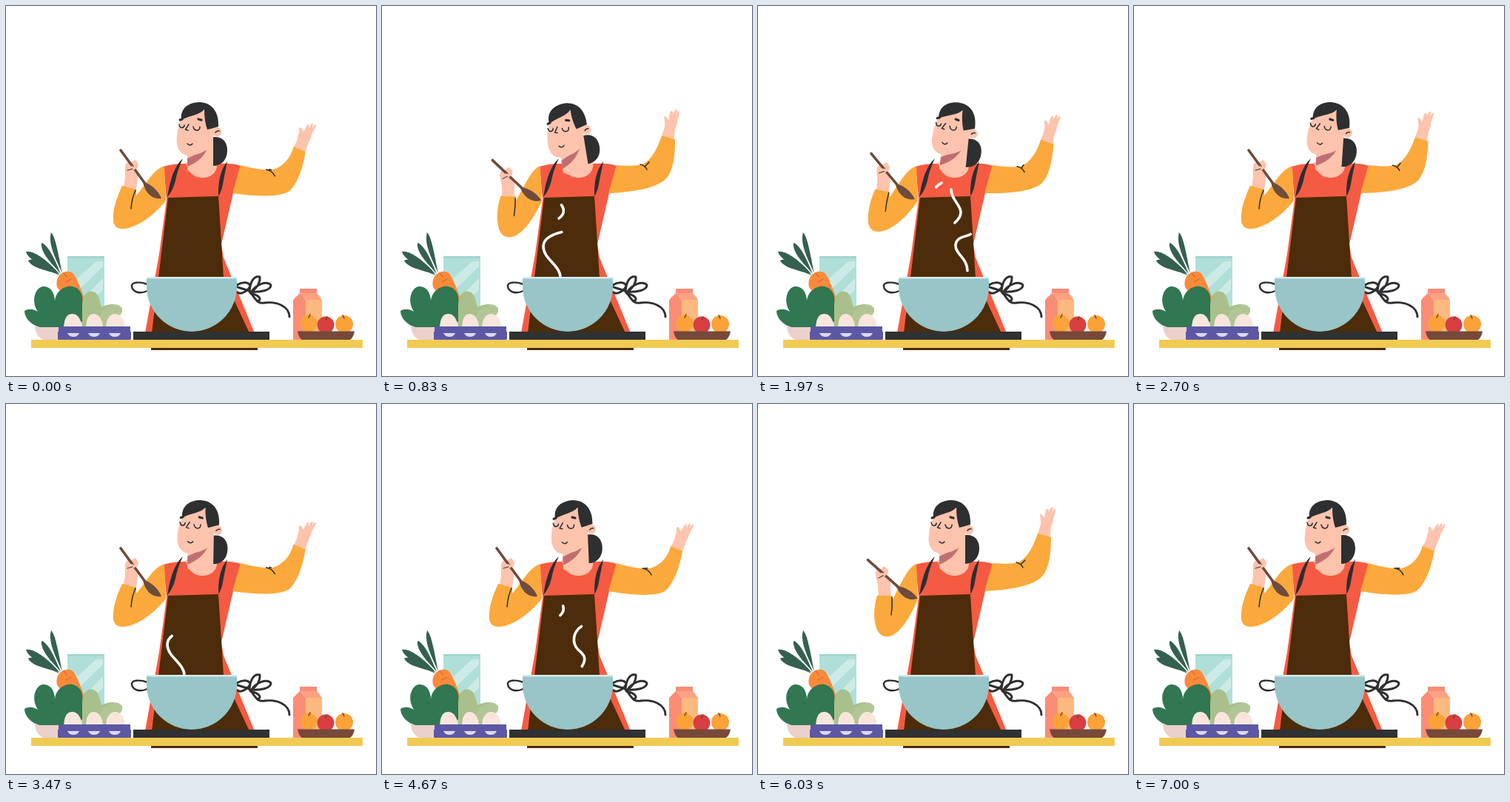
Animation of 500 by 500 pixels, one loop 7.03 s. Source, as an HTML page:

```html
<!DOCTYPE html>
<html lang="en">
<head>
<meta charset="utf-8">
<title>Cooking</title>
<style>
  html, body { margin: 0; width: 100%; height: 100%; overflow: hidden; background: #fff; }
  svg { display: block; width: 100%; height: 100%; }
  .line { fill: none; stroke: #2e2f31; stroke-linecap: round; stroke-linejoin: round; }
  .ink { fill: #2e2f31; }
  .skin { fill: #fdc3ad; }
  .sleeve { fill: #fba93c; }
  .steam path { fill: none; stroke: #fff; stroke-width: 3.6; stroke-linecap: round; }
</style>
</head>
<body>
<svg viewBox="0 0 500 500">
  <!-- glass and vegetables -->
  <rect x="83" y="338" width="50" height="95" fill="#b0dfd9"/>
  <path d="M83 338H133V341H83Z" fill="#a3d5cf"/>
  <path d="M92 372L122 345H131V352L100 382ZM104 396L131 368V384L112 402Z" fill="#cdebe6"/>
  <g fill="#33604f">
    <path d="M76 361C69 345 56 322 61 306C67 312 70 332 76 361Z"/>
    <path d="M74 362C64 350 46 334 48 320C57 323 66 342 74 362Z"/>
    <path d="M73 363C58 353 31 346 27 332C37 330 56 343 73 363Z"/>
    <path d="M72 364C60 357 36 356 30 344C40 339 58 348 72 364Z"/>
  </g>
  <path d="M69 379C66 365 78 355 89 360C94 363 102 383 108 401C96 397 74 391 69 379Z" fill="#f98a3c"/>
  <path class="line" d="M81 373L88 369M90 386L97 381M78 361L82 366" style="stroke:#d96a2b;stroke-width:1.3"/>
  <path d="M103 435V401C104 383 122 380 126 396L129 407C142 400 156 403 157 410C153 413 156 418 150 423L140 436Z" fill="#a9bf8c"/>
  <path d="M122 434C124 416 135 403 150 404C160 407 158 414 154 418L146 435Z" fill="#b2c596"/>
  <path d="M39 433H78V452H53Q40 448 39 433Z" fill="#ecd0cb"/>
  <path d="M48 434C39 434 25 424 25 412C31 408 38 410 43 413C33 398 40 380 50 379C60 378 66 388 66 399C67 385 80 377 90 379C101 382 105 391 103 403L103 426L95 434Z" fill="#317752"/>
  <path d="M78 434C79 420 83 416 90 416C98 416 102 426 103 434ZM108 434C109 421 112 416 119 416C126 416 131 426 131 434ZM135 434C136 421 141 416 148 416C156 416 161 426 161 434Z" fill="#f8e6dc"/>
  <path d="M71 433H168V440H169V449Q169 452 166 452H73Q70 452 70 449V440H71Z" fill="#5c58a5"/>
  <path d="M83 442H99Q97 447 91 447T83 442ZM111 442H127Q125 447 119 447T111 442ZM139 442H155Q153 447 147 447T139 442Z" fill="#dcd9ee"/>

  <!-- milk and fruit -->
  <path d="M397 388L388 397V453H405V397Z" fill="#f98d75"/>
  <path d="M397 388H420L427 397V453H405V397Z" fill="#fbb97f"/>
  <path d="M397 388H420L427 397H405Z" fill="#fba184"/>
  <path d="M397 382H420V388H397Z" fill="#f98d75"/>
  <circle cx="409" cy="429" r="11.5" fill="#fba338"/>
  <circle cx="432" cy="431" r="11.5" fill="#d83f40"/>
  <circle cx="457" cy="430" r="12" fill="#fba338"/>
  <path class="line" d="M409 421L411 417M432 424L434 420M457 422L455 418" style="stroke:#6b4a2a;stroke-width:1.6"/>
  <path d="M394 439.500H471Q469 453 457 453H407Q396 453 394 439.500Z" fill="#76493a"/>

  <!-- dress, apron, ties -->
  <path d="M213 217Q225 213 242 213H288Q306 212 317 216L307 253L291 322L294 340L336 442H188L207 335L217 262Z" fill="#f55b42"/>
  <path d="M219 259L287 257L294 367L329 442H197L206 367Z" fill="#4c2c0a"/>
  <path d="M196 461H340V465H196Z" fill="#4c2c0a"/>
  <path class="line" d="M191 376C180 372 169 373 170 379C171 386 180 390 191 385" stroke-width="2.400"/>
  <g class="line" stroke-width="2.900">
    <path d="M312 377C320 372 328 373 330 378C328 384 318 391 313 387M313 380L329 385M329 386C330 374 334 364 343 366C344 375 338 382 330 388M331 387C338 376 352 371 358 377C358 384 345 387 332 386"/>
    <path d="M331 388C338 397 340 403 350 401C366 399 383 406 383 420M333 389C341 391 347 396 340 399"/>
  </g>

  <path class="skin" d="M243 211H285C287 225 276 233 263 232C253 231 246 224 243 211Z"/>
  <g id="head">
    <path class="ink" d="M276 178C291 174 299 183 299 195C299 208 291 216 280 216H276Z"/>
    <path class="skin" d="M245 196L280 168V224Q262 235 245 222Z"/>
    <path d="M245 206L272 193Q265 209 245 217Z" fill="#c06f70"/>
    <path class="skin" d="M239 146L232 168Q230 181 231 187Q234 202 248 202Q264 201 276 191L280 176V140Z"/>
    <circle class="skin" cx="285" cy="170" r="6.300"/>
    <path class="ink" d="M237 154C235 138 247 130 262 130C280 131 288 145 287 163L280 165L272 167C269 158 268 150 268 140C262 147 248 148 237 154Z"/>
    <g class="line" stroke-width="1.500">
      <path d="M234 160Q235 165 238 164.500T241 161M253 163Q254 168 258 168T262 163M247 160L242.500 167L246 168M245 186Q249 190 252 186M283 171Q285 168 288 169"/>
      <path d="M235 154L238 153M260 153L264 154" stroke-width="3.200"/>
    </g>
  </g>
  <path class="ink" d="M239 206Q224 219 218 258Q225 251 229 236Q231 223 239 206ZM299 210Q286 226 287 257Q292 250 294 235Z"/>

  <!-- arms -->
  <path id="handR" class="skin"/>
  <path id="sleeveR" class="sleeve"/>
  <path id="creaseR" class="line" stroke-width="1.500"/>
  <g id="grip">
    <path class="skin" d="M158 249L161 233L161 216Q163 210 169 211L175 208L177 211L179 214L178 218L175 222L179 228L175 252Z"/>
  </g>
  <path id="sleeveL" class="sleeve"/>
  <path id="creaseL" class="line" stroke-width="1.500"/>
  <g id="spoon">
    <path d="M155 195L188 240" stroke="#6d4c3d" stroke-width="3.600" stroke-linecap="round"/>
    <path d="M185 238C194 239 206 249 210 260C198 262 188 253 185 238Z" fill="#6d4c3d"/>
    <path class="skin" d="M162 219Q166 214 172 217L176 215L178 219L169 223Z"/>
    <path class="line" d="M164 222L171 220" stroke-width="1"/>
  </g>

  <g class="steam" id="steam"></g>

  <!-- bowl, stove, table -->
  <path d="M190 366H312V379A61 61 0 0 1 190 379Z" fill="#97c5c8"/>
  <path d="M190 366H312V368.500H190Z" fill="#d5ebec"/>
  <rect x="172" y="440" width="184" height="12" fill="#303133"/>
  <rect x="34" y="451" width="448" height="11" fill="#f1ca53"/>
</svg>
<script>
const LOOP = 7030;
const $ = id => document.getElementById(id);

// Pose pairs: resting and raised
const shapes = {
  sleeveR: [
    "M317 215C328 219 345 222 358 223C376 220 387 206 390 192L406 199C402 222 393 245 382 253C370 260 340 259 306 253Z",
    "M317 215C330 216 343 217 354 213C365 206 372 192 378 175L396 180C396 200 394 222 384 233C372 245 345 251 306 253Z"],
  handR: [
    "M389 196L395 184Q396 177 398 173L398 167Q400 165 402 168L404 172L409 164Q411 161 412 164L411 168L415 162Q417 161 417 164L416 168L419 163Q422 162 421 165L415 176Q414 181 411 186L405 202Z",
    "M377 178L381 166Q383 160 382 157L381 150Q382 147 384 150L387 154L389 143Q391 140 393 143L392 147L396 140Q398 138 399 141L397 147L400 142Q403 141 402 144L399 155Q399 160 396 166L394 183Z"],
  creaseR: ["M352 222Q360 223 364 231M355 222L359 222", "M349 214Q356 216 358 221M361 211L355 217"],
  sleeveL: [
    "M214 216C198 222 190 240 176 256L176 248L157 243C149 260 144 275 145 291C147 302 157 302 166 300C186 294 203 279 216 263Z",
    "M214 216C202 221 195 240 182 264L181 259L161 259C156 275 156 290 160 303C165 316 175 316 183 312C195 305 207 285 216 264Z"],
  creaseL: ["M175 249Q170 260 169 274", "M181 261Q182 273 180 285"]
};

// Keys: [ms, value], eased between
const headKeys = [[0, 0], [270, 0], [880, -9.4], [2050, 6], [3500, 1], [4400, 0], [5200, -9], [6100, 0.2], [LOOP, 0]];
const rightKeys = [[0, .12], [270, .12], [800, 1], [1380, 0], [2350, 1], [3800, 0], [5250, 0], [6050, 1], [7000, .02], [LOOP, .02]];
const leftKeys = [[0, 0], [270, 0], [1000, 1], [1150, 1], [2430, 0], [4690, 0], [5900, 1], [6050, 1], [7000, 0], [LOOP, 0]];

// Steam lines: path, length, then head start/end and tail start/end
const swirl = "M241 367C241 350 218 342 218 325C218 312 236 307 245 305C258 300 274 290 274 279C274 268 261 262 261 248";
const wisp = "M239 287C246 282 248 275 241 267C234 258 235 246 248 239";
const steam = [
  [swirl, 167, 400, 1235, 950, 2445],
  [swirl, 167, 3145, 3980, 3600, 4620],
  [wisp, 60, 720, 1020, 900, 2180],
  [wisp, 60, 4585, 4885, 4640, 5500],
  ["M284 367L283 358C283 340 267 336 267 324C267 312 280 312 286 309C298 303 296 285 284 272", 115, 1600, 2175, 1920, 2560],
  ["M266 367L270 355C278 343 272 338 265 332C255 322 258 303 277 297C285 292 288 280 276 268", 115, 4300, 4875, 4600, 5240]
].map(([d, len, ...times]) => {
  const el = document.createElementNS("http://www.w3.org/2000/svg", "path");
  el.setAttribute("d", d);
  el.setAttribute("pathLength", len);
  $("steam").append(el);
  return { el, len, times };
});

const ramp = (t, a, b) => Math.min(1, Math.max(0, (t - a) / (b - a)));

function curve(keys, t) {
  const i = Math.max(1, keys.findIndex(k => k[0] >= t));
  const [t0, a] = keys[i - 1], [t1, b] = keys[i];
  const s = ramp(t, t0, t1);
  return a + (b - a) * s * s * (3 - 2 * s);
}

function morph(id, u) {
  const [a, b] = shapes[id];
  const ends = b.match(/\d+/g);
  let i = 0;
  $(id).setAttribute("d", a.replace(/\d+/g, n => (+n + (ends[i++] - n) * u).toFixed(2)));
}

function draw(t) {
  $("head").setAttribute("transform", `rotate(${curve(headKeys, t)} 263 224)`);

  const right = curve(rightKeys, t);
  ["sleeveR", "handR", "creaseR"].forEach(id => morph(id, right));

  const left = curve(leftKeys, t);
  ["sleeveL", "creaseL"].forEach(id => morph(id, left));
  const hold = `translate(0 ${12 * left}) rotate(${-12 * left} 169 228)`;
  $("grip").setAttribute("transform", hold);
  $("spoon").setAttribute("transform", hold);

  for (const { el, len, times: [h0, h1, t0, t1] } of steam) {
    const tail = len * ramp(t, t0, t1);
    const size = len * ramp(t, h0, h1) - tail;
    el.style.display = size > 0.5 ? "" : "none";
    el.style.strokeDasharray = `${Math.max(size, 0.1)} ${len * 3}`;
    el.style.strokeDashoffset = -tail;
  }
}

const start = performance.now();
function tick() {
  draw((performance.now() - start) % LOOP);
  requestAnimationFrame(tick);
}
draw(0);
requestAnimationFrame(tick);
</script>
</body>
</html>
```
